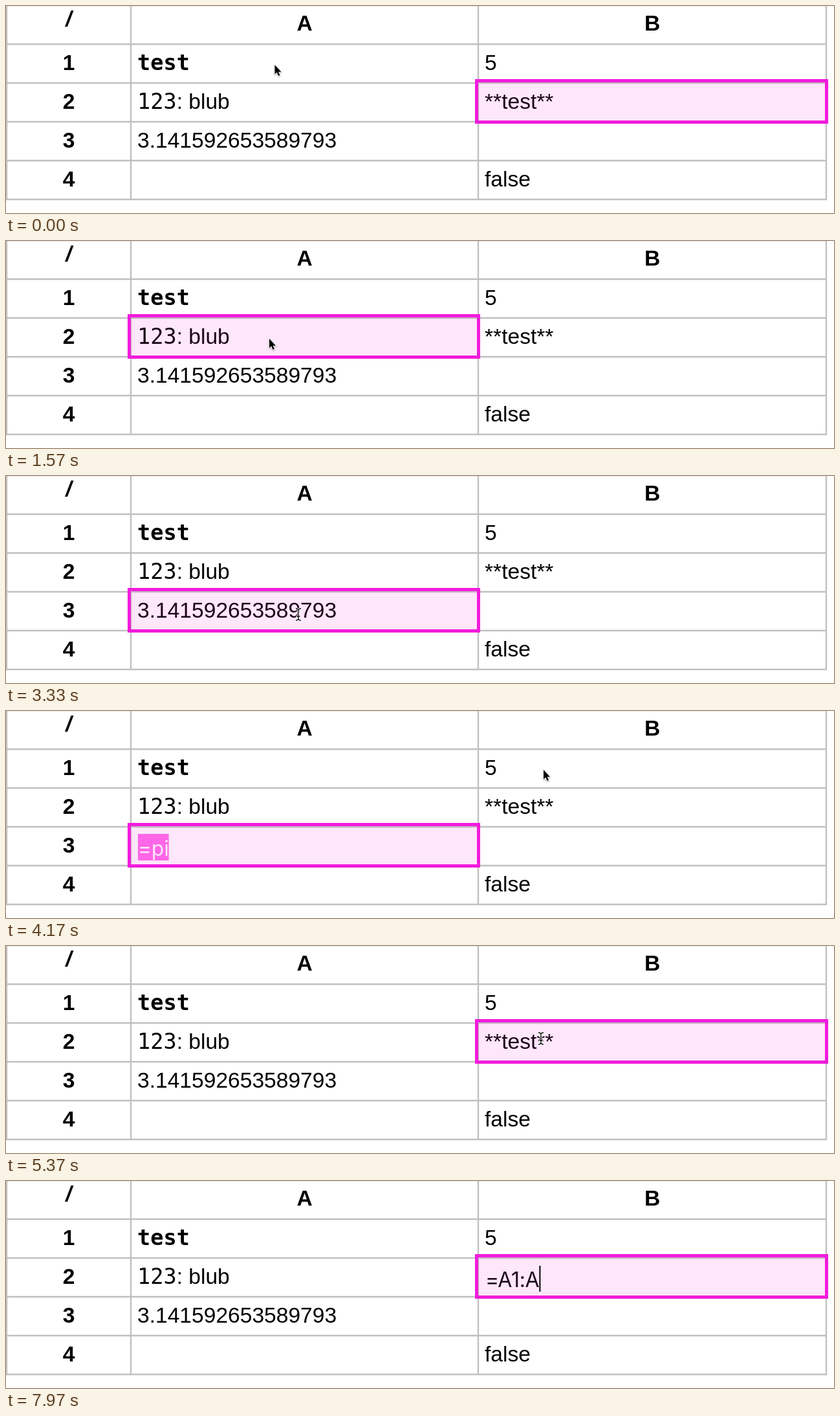
An HTML page for the animation above (8 s loop, 1280 by 320 pixels).

```html
<!DOCTYPE html>
<html lang="en">
<head>
<meta charset="utf-8">
<title>Spreadsheet editing</title>
<style>
  html, body { margin: 0; width: 100%; height: 100%; overflow: hidden; background: #fff; }
  svg { display: block; }
  text { font: 33.6px "Liberation Sans", Arial, sans-serif; white-space: pre; }
  .head { font-weight: bold; text-anchor: middle; }
  .code { font-family: "DejaVu Sans Mono", monospace; }
  #input { font: 32px Inter, Roboto, sans-serif; letter-spacing: -.3px; }
  #arrow { filter: drop-shadow(0 1.5px 1px #0005); }
</style>
</head>
<body>
<svg width="1280" height="320" viewBox="0 0 1280 320">
  <path d="M0 .3H1269" stroke="#ddd" stroke-width=".8"/>
  <path d="M1 0V300M193 0V300M730 0V300M1268 0V300M0 59H1269M0 119H1269M0 179H1269M0 239H1269M0 299H1269"
        stroke="#c0c0c0" stroke-width="2.4"/>
  <g id="cells">
    <text class="head" x="97" y="31" font-style="italic" style="font-style:italic">/</text>
    <text class="head" x="461.5" y="38">A</text>
    <text class="head" x="999" y="38">B</text>
  </g>
  <rect id="box" height="64" fill="#f21bdc" fill-opacity=".11" stroke="#f21bdc" stroke-width="5"/>
  <g id="editor">
    <rect id="mark" y="11" height="41" fill="#ff66e8"/>
    <text id="input" y="44.5"></text>
    <path id="spell" fill="none" stroke="#f0285f" stroke-width="5" stroke-linecap="round" stroke-dasharray="0 8.2"/>
    <path id="caret" stroke="#000" stroke-width="2"/>
  </g>
  <g id="pointer">
    <path id="arrow" d="M0 0V14.5L3.2 11.6L5.6 17L8 16L5.6 10.7H10Z"
          stroke="#fff" stroke-width="1.6" paint-order="stroke"/>
    <g id="beam" fill="none" stroke-linecap="round">
      <path id="stem" d="M-3.5 -9Q0 -9 0 -6V6Q0 9 -3.5 9M3.5 -9Q0 -9 0 -6M0 6Q0 9 3.5 9M-2 3H2"
            stroke="#fff" stroke-width="3.2"/>
      <use href="#stem"/>
    </g>
  </g>
</svg>
<script>
const LOOP = 8000;
const $ = id => document.getElementById(id);
const set = (el, attrs) => { for (const k in attrs) el.setAttribute(k, attrs[k]); };

const columns = { A: { x: 193, w: 540 }, B: { x: 730, w: 541 } };
const cellAt = name => ({ ...columns[name[0]], y: 60 * name[1] - 1 });

const contents = {
  A1: '<tspan class="code" font-weight="bold">test</tspan>',
  A2: '<tspan class="code">123</tspan>: blub',
  A3: '3.141592653589793',
  B1: '5',
  B2: '**test**',
  B4: 'false'
};

// time, cell, edited text, whether that text is selected
const states = [
  [0, 'B2'],
  [230, 'A1'], [400, 'A1', '**test**', true],
  [1570, 'A2'], [1730, 'A2', '`123`: blub', true],
  [3300, 'A3'], [3430, 'A3', '=pi', true],
  [5370, 'B2'], [5470, 'B2', '**test**', true],
  [5570, 'B2', '='], [6330, 'B2', '=A'], [6800, 'B2', '=A1'],
  [7250, 'B2', '=A1:'], [7500, 'B2', '=A1:A']
];

// time, x, y
const path = [
  [0, 415.5, 91], [630, 415.5, 91], [1300, 407, 151], [1800, 407, 151],
  [2550, 452, 214], [3600, 452, 214], [3950, 880, 120], [4150, 831, 91],
  [4630, 831, 91], [4800, 827, 143], [LOOP, 827, 143]
];
const HIDE_POINTER = 5930;

function addText(html, x, y, head) {
  const el = document.createElementNS('http://www.w3.org/2000/svg', 'text');
  set(el, { x, y, class: head ? 'head' : '' });
  el.innerHTML = html;
  $('cells').append(el);
  return el;
}

const texts = {};
for (let row = 1; row <= 4; row++) addText(row, 97, 39 + 60 * row, true);
for (const name in contents) {
  const { x, y } = cellAt(name);
  texts[name] = addText(contents[name], x + 10, y + 40);
}

function pointerAt(t) {
  const i = path.findIndex(p => p[0] > t);
  const [t0, x0, y0] = path[i - 1], [t1, x1, y1] = path[i];
  const u = (t - t0) / (t1 - t0), e = u * u * (3 - 2 * u);
  return { x: x0 + (x1 - x0) * e, y: y0 + (y1 - y0) * e };
}

const inside = (p, x, y, w, h) => p.x >= x && p.x <= x + w && p.y >= y && p.y <= y + h;

function overText(p, cell, editing) {
  if (editing && inside(p, cell.x, cell.y, cell.w, 60)) return true;
  return Object.values(texts).some(el => {
    const b = el.getBBox();
    return inside(p, b.x, b.y, b.width, b.height);
  });
}

function drawEditor(cell, text, selected) {
  const input = $('input'), left = cell.x + 11;
  input.textContent = text;
  set(input, { x: left, fill: selected ? '#fde6fb' : '#1c0a1a' });
  set($('editor'), { transform: `translate(0 ${cell.y})` });
  const width = input.getComputedTextLength();
  set($('mark'), { x: left, width: selected ? width : 0 });
  set($('caret'), { d: selected ? '' : `M${left + width + 1} 12V52` });
  const word = text.indexOf('blub');
  const start = word < 0 ? 0 : left + input.getSubStringLength(0, word) + 3;
  set($('spell'), { d: word < 0 ? '' : `M${start} 48H${left + width - 1}` });
}

function draw(t) {
  const [, name, text, selected] = states.findLast(s => s[0] <= t);
  const cell = cellAt(name), editing = text !== undefined;
  set($('box'), { x: cell.x - 2.5, y: cell.y - 3.5, width: cell.w });
  for (const key in texts) {
    set(texts[key], { visibility: editing && key === name ? 'hidden' : 'visible' });
  }
  set($('editor'), { visibility: editing ? 'visible' : 'hidden' });
  if (editing) drawEditor(cell, text, selected);

  const p = pointerAt(t), beam = overText(p, cell, editing);
  set($('pointer'), {
    transform: `translate(${p.x} ${p.y})`,
    display: t < HIDE_POINTER ? 'inline' : 'none'
  });
  set($('arrow'), { display: beam ? 'none' : 'inline' });
  set($('beam'), { display: beam ? 'inline' : 'none' });
}

// Dark stem on top of the light halo
const stem = $('stem').cloneNode();
stem.removeAttribute('id');
set(stem, { stroke: '#000', 'stroke-width': 1.3 });
$('beam').lastElementChild.replaceWith(stem);

const begin = performance.now();
function tick() {
  draw((performance.now() - begin) % LOOP);
  requestAnimationFrame(tick);
}
tick();
</script>
</body>
</html>
```
